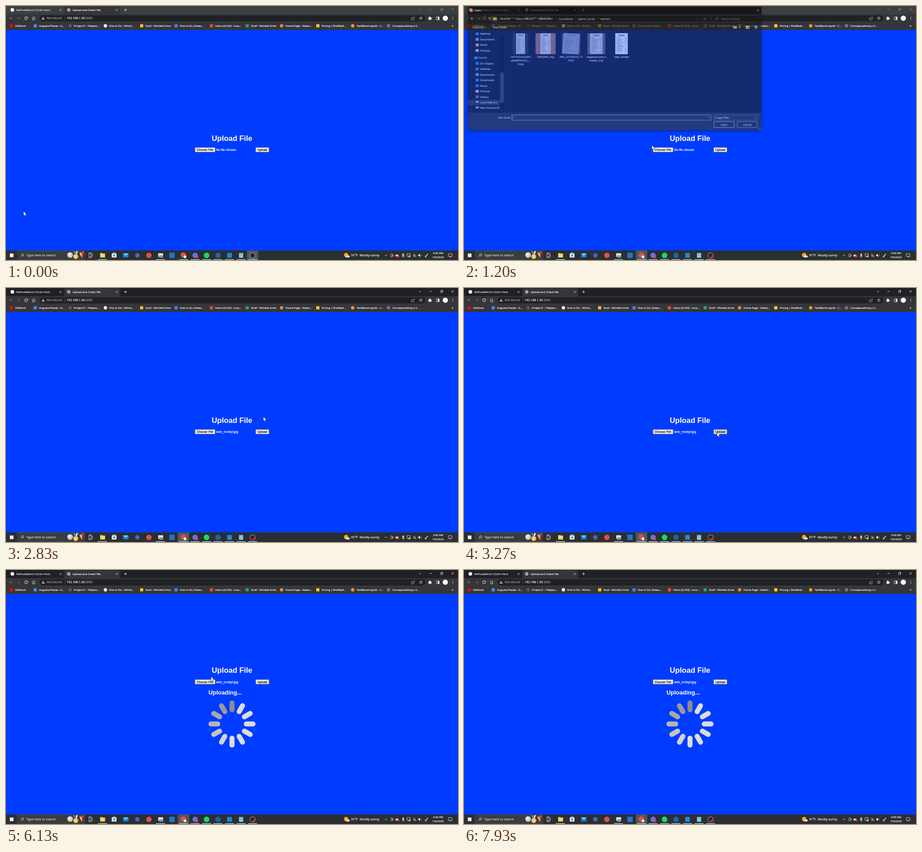
These frames come from a looping animation (998x561 px, 8000 ms). An HTML page with a canvas:

```html
<!DOCTYPE html>
<html lang="en">
<head>
<meta charset="utf-8">
<title>Upload and Check File</title>
<style>
html, body { margin: 0; width: 100%; height: 100%; overflow: hidden; background: #003cff; }
canvas { display: block; }
</style>
</head>
<body>
<canvas id="stage" width="998" height="561"></canvas>
<script>
const W = 998, H = 561, LOOP = 8000;
const FOCUS = 780, OPEN = 1130, PICK = 1900, CLOSE = 2570, UPLOAD = 3415;
const UI = '"Open Sans", "Noto Sans", sans-serif';
const PAGE = '"Liberation Sans", Arial, sans-serif';

const screen = document.getElementById('stage').getContext('2d');
const layer = document.createElement('canvas');
layer.width = W;
layer.height = H;
const dialogCtx = layer.getContext('2d');
let g = screen;

// ---- drawing helpers ----
function rect(x, y, w, h, fill, r = 0, line) {
  g.beginPath();
  g.roundRect(x, y, w, h, r);
  if (fill) { g.fillStyle = fill; g.fill(); }
  if (line) { g.strokeStyle = line; g.lineWidth = 0.8; g.stroke(); }
}
function box(x, y, size, fill, r = 0) {
  rect(x - size / 2, y - size / 2, size, size, fill, r);
}
function disc(x, y, r, fill) {
  g.beginPath();
  g.arc(x, y, r, 0, 7);
  g.fillStyle = fill;
  g.fill();
}
function ring(x, y, r, color, from = 0, to = 6.3, w = 0.9) {
  g.beginPath();
  g.arc(x, y, r, from, to);
  g.strokeStyle = color;
  g.lineWidth = w;
  g.stroke();
}
function line(color, pts, w = 0.9) {
  g.beginPath();
  for (let i = 0; i < pts.length; i += 2) g.lineTo(pts[i], pts[i + 1]);
  g.strokeStyle = color;
  g.lineWidth = w;
  g.stroke();
}
function poly(fill, pts) {
  g.beginPath();
  for (let i = 0; i < pts.length; i += 2) g.lineTo(pts[i], pts[i + 1]);
  g.closePath();
  g.fillStyle = fill;
  g.fill();
}
// y is the middle of the capital letters; small text gets a hairline for weight
function text(s, x, y, color = '#f1f3f4', size = 6, align = 'left', font = UI, weight = '') {
  g.font = `${weight} ${size}px ${font}`;
  g.textAlign = align;
  g.fillStyle = g.strokeStyle = color;
  g.lineWidth = 0.22;
  g.fillText(s, x, y + size * 0.36);
  if (size < 8) g.strokeText(s, x, y + size * 0.36);
}
const cross = (x, y, c, d = 2) => {
  line(c, [x - d, y - d, x + d, y + d]);
  line(c, [x - d, y + d, x + d, y - d]);
};
const chevron = (x, y, c, d = 2) => line(c, [x - d, y - d / 2, x, y + d / 2, x + d, y - d / 2]);
function arrow(x, y, dir, c) {
  line(c, [x - 3, y, x + 3, y], 1);
  line(c, [x, y - 2.6, x + dir * 3, y, x, y + 2.6], 1);
}
function upArrow(x, y, c) {
  line(c, [x, y + 3, x, y - 3], 1);
  line(c, [x - 2.6, y - 0.4, x, y - 3, x + 2.6, y - 0.4], 1);
}
function lens(x, y, c) {
  ring(x + 0.8, y - 0.8, 2.4, c);
  line(c, [x - 1, y + 1, x - 3.2, y + 3.2]);
}
function folder(x, y, s = 1) {
  rect(x - 4 * s, y - 4 * s, 4 * s, 3 * s, '#d9a32b', 0.5);
  rect(x - 4 * s, y - 3 * s, 8 * s, 6.5 * s, '#fbd568', 0.5);
}
function star(x, y, r, color) {
  const pts = [];
  for (let i = 0; i <= 10; i++) {
    const a = i * Math.PI / 5, q = i % 2 ? r * 0.45 : r;
    pts.push(x + q * Math.sin(a), y - q * Math.cos(a));
  }
  line(color, pts, 0.8);
}
const clamp = (v) => Math.min(1, Math.max(0, v));

// ---- browser ----
const bookmarks = [
  [20, 'VidNook', '#f00', 1], [73, 'Augusta Places - G...', '#4688f4', 0],
  [150, 'Project E – Tileplac...', '#55585c', 1], [228, 'Five to Six - Wimb...', '#f2f2f2', 1],
  [308, 'food - Wimble Drive', '#f0bd2d', 0], [384, 'Five to Six, Notes...', '#3d84e8', 0],
  [462, 'Inbox (6,163) - tuva...', '#e34b3f', 0], [541, 'Stuff - Wimble Drive', '#22a565', 0],
  [617, 'Home Page - Select...', '#e08a3a', 1], [697, 'Pricing | Briefleaf...', '#f2cc35', 0],
  [774, 'TestBench.ipynb - C...', '#f29a1d', 1], [853, 'Conceptualizing a S...', '#6e7480', 0]
];

function browser(active) {
  const ink = '#dfe1e5', cap = active ? '#e8eaed' : '#85888c';
  rect(0, 0, W, 18, active ? '#202124' : '#3c4043');
  rect(0, 18, W, 35, '#35363a');
  rect(129, 1, 123, 18, '#35363a', [4, 4, 0, 0]);
  disc(14, 8.5, 4, '#f4f4f4');
  text('MsPuddleFox7 (Colin Hart)', 23, 8.5, '#d5d8dc');
  cross(120.5, 8.7, ink);
  disc(138.5, 8.5, 3.8, '#aeb3b8');
  line('#55585c', [135.5, 7, 138, 8.5, 137, 11], 1);
  line('#55585c', [139.5, 5.5, 141.5, 8], 1);
  text('Upload and Check File', 147, 8.5);
  cross(244.5, 8.7, ink);
  line(ink, [261, 8.5, 267, 8.5], 1);
  line(ink, [264, 5.5, 264, 11.5], 1);
  chevron(914, 8, cap);
  line(cap, [935, 7.5, 940, 7.5]);
  rect(959.5, 6, 4, 4, null, 0, cap);
  line(cap, [961, 5, 964.6, 5, 964.6, 8.8], 0.7);
  cross(986, 7.5, cap, 2.4);

  arrow(11, 27, -1, '#85888c');
  arrow(28, 27, 1, '#696c70');
  ring(44.5, 27, 3, ink, 0.3, 5.5, 1.1);
  poly(ink, [45.5, 26.5, 48.4, 26.5, 48.4, 23.6]);
  line(ink, [57.5, 27, 61, 23.5, 64.5, 27], 1);
  line(ink, [58.8, 26, 58.8, 30.5, 63.2, 30.5, 63.2, 26], 1);
  rect(74, 20.5, 852, 13.5, '#202124', 6.7);
  poly('#a9adb2', [82, 23.4, 85.8, 30, 78.2, 30]);
  line('#202124', [82, 25.8, 82, 28.2], 0.8);
  text('Not secure', 90, 27, '#9aa0a6', 6.7);
  line('#5f6368', [130, 23, 130, 31], 0.7);
  text('192.168.1.30', 134, 27, '#f1f3f4', 6.7);
  text(':3000', 134 + g.measureText('192.168.1.30').width, 27, '#9aa0a6', 6.7);
  line('#bdc1c6', [897, 26, 895.5, 26, 895.5, 30.5, 901, 30.5, 901, 28.5], 0.8);
  line('#bdc1c6', [897, 28, 899, 25.5, 902, 25.5], 0.8);
  line('#bdc1c6', [900.3, 23.7, 902.3, 25.5, 900.3, 27.3], 0.8);
  star(916, 27, 3.6, '#dfe1e5');
  rect(933, 25, 5.6, 5.6, '#f1f3f4', 0.8);
  disc(935.8, 24.6, 1.3, '#f1f3f4');
  disc(939, 27.8, 1.3, '#f1f3f4');
  rect(950, 24, 6.5, 6.5, null, 0.6, '#f1f3f4');
  rect(953.4, 24, 3.2, 6.5, '#f1f3f4');
  disc(970, 27, 5.8, '#fff');
  for (const d of [-2.6, 0, 2.6]) disc(986.5, 27 + d, 0.75, '#f1f3f4');

  for (const [x, label, color, round] of bookmarks) {
    if (round) disc(x - 8.5, 43.7, 3.7, color);
    else box(x - 8.5, 43.7, 7, color, 0.8);
    text(label, x, 43.7);
  }
  text('»', 986, 43.5, '#e8eaed', 7, 'center');
}

// ---- web page ----
function button(x, y, w, label, hot) {
  rect(x, y - 5, w, 10, hot ? '#dedede' : '#efefef', 1.3, '#767676');
  text(label, x + w / 2, y, '#111', 6.93, 'center', PAGE);
}
function page(t) {
  const busy = t >= UPLOAD, y = busy ? -70.5 : 0;
  rect(0, 53, W, 488, '#003cff');
  text('Upload File', 499, 291.8 + y, '#fff', 16.63, 'center', PAGE, 'bold');
  button(417.3, 317.6 + y, 44.5, 'Choose File', t > 700 && t < OPEN);
  text(t < CLOSE + 40 ? 'No file chosen' : 'web_reciept.jpg', 464, 317.6 + y, '#fff', 6.93, 'left', PAGE);
  button(551.3, 317.6 + y, 29.4, 'Upload', t > 3050 && !busy);
  if (!busy) return;
  text('Uploading...', 447, 270, '#fff', 12.9, 'left', PAGE, 'bold');
  spinner(499, 340, Math.floor((t - UPLOAD) / 75));
}
function spinner(x, y, head) {
  g.lineCap = 'round';
  for (let k = 0; k < 12; k++) {
    const a = (head - k) * Math.PI / 6, s = Math.sin(a), c = Math.cos(a);
    const v = Math.min(220, 140 + 14 * k);
    line(`rgb(${v},${v},${v})`, [x + 31.5 * s, y - 31.5 * c, x + 46.5 * s, y - 46.5 * c], 11);
  }
  g.lineCap = 'butt';
}

// ---- taskbar ----
function taskbar(t) {
  const ink = '#f1f1f1';
  rect(0, 540, W, 21, '#2b2e32');
  box(12.5, 550.7, 8, ink);
  rect(25, 540.4, 149, 20.2, '#3a3d40', 0, '#4a4d50');
  lens(36, 550.5, ink);
  text('Type here to search', 45, 550.7, '#d0d2d4', 7.1);
  disc(141.5, 550, 6.2, '#c9ccd0');
  disc(140, 548.5, 3.2, '#e6e8ea');
  poly('#3f8bd0', [148, 541.5, 152, 541.5, 156, 549, 153, 550]);
  poly('#e9eef2', [155, 541.5, 159, 541.5, 156, 549, 154, 549]);
  disc(154, 553.3, 5.6, '#e8b73a');
  disc(154, 553.3, 3.4, '#f6d67a');
  poly('#d2492f', [161, 545, 172, 541.6, 168, 557, 164.5, 551]);
  poly('#f0d2a8', [163, 546, 166, 545, 168, 555, 166, 553]);
  rect(183, 547, 5, 7, null, 0, ink);
  line(ink, [190.5, 546.5, 190.5, 555]);
  line(ink, [182.5, 545.2, 188.5, 545.2]);
  line(ink, [182.5, 555.8, 188.5, 555.8]);

  rect(t < FOCUS ? 532 : 379.5, 540, 25, 21, '#54575a');
  folder(213.3, 550.8, 1.35);
  rect(233.5, 546.5, 10.5, 9, '#f3f3f3', 1);
  line('#f3f3f3', [236.5, 547, 236.5, 545, 241, 545, 241, 547]);
  box(238.8, 551, 4.5, '#2b9be0');
  rect(258.5, 546.5, 12, 8.8, '#1583d8', 0.8);
  poly('#7fd0ff', [258.5, 546.5, 270.5, 546.5, 264.5, 551.5]);
  disc(290, 550.8, 5, '#4767b5');
  disc(315.5, 550.8, 6, '#dd5144');
  rect(336, 546, 11, 8, '#d9dcdf', 1);
  rect(338, 551, 9, 5, '#8b9299', 1);
  box(366.5, 550.8, 12, '#2374c6', 0.5);
  disc(391.5, 550, 6, '#dd5144');
  disc(395.3, 554, 3, '#f5f5f5');
  disc(417.5, 550.8, 6, '#6a70e0');
  disc(421.5, 554.3, 2.7, '#e5483f');
  disc(442.8, 550.8, 6.2, '#1ed760');
  disc(468, 550.8, 6, '#2a5f9e');
  box(493.5, 550.8, 10.5, '#2489ca', 1);
  rect(514.5, 545, 9, 11, '#a7d3e4', 0.8);
  rect(514.5, 545, 9, 2, '#5793ab');
  for (let i = 0; i < 3; i++) line('#5c7a88', [516, 549 + i * 2, 522, 549 + i * 2], 0.6);
  disc(544.5, 550.8, 6.1, '#d9d9d9');
  disc(544.5, 550.8, 5.3, '#242326');
  if (t > 200) disc(548, 554, 2.9, '#e01f1f');
  for (const x of [213, 341, 392, 417.5, 443, 468, 493.5, 519, 544.5])
    rect(x - 10, 559.3, 20, 1.7, '#7cc3d8');

  disc(751, 550, 4.8, '#f6a623');
  rect(750, 551, 9, 4.5, '#d7dce2', 2.2);
  text('91°F', 762, 550.8, ink, 7);
  text('Mostly sunny', 781, 550.8, ink, 7);
  line(ink, [836.5, 552, 839, 549.5, 841.5, 552]);
  rect(850, 547.5, 3.5, 6.5, null, 1, ink);
  line(ink, [855, 549, 855, 552.5]);
  rect(860, 549, 7, 4.5, '#e6e6e6', 2);
  disc(866, 553, 2.5, '#e0352b');
  rect(875.5, 546.5, 3, 5.5, ink, 1.5);
  ring(877, 551, 3, ink, 0, Math.PI, 0.8);
  line(ink, [877, 554, 877, 556]);
  rect(885.5, 547, 7, 6, null, 0, ink);
  box(891, 553, 4, '#f0c040');
  for (let i = 1; i < 4; i++) ring(899, 554, i * 2, ink, -1.5, 0, 0.9);
  poly(ink, [910, 549.5, 911.5, 549.5, 914, 547, 914, 554.5, 911.5, 552, 910, 552]);
  ring(914, 550.8, 2.8, ink, -0.8, 0.8, 0.7);
  line(ink, [926, 554, 931.5, 547.5], 1.4);
  ring(927, 553, 2, ink, 0.5, 4, 0.7);
  text('3:45 PM', 954, 546, ink, 6, 'center');
  text('7/6/2023', 954, 555.3, ink, 6, 'center');
  rect(976.8, 547, 8, 6, null, 0, ink);
  line(ink, [979.5, 553, 981, 555, 982.5, 553]);
}

// ---- file dialog ----
const crumbs = [[79, 'This PC'], [112, 'Local Disk (C:)'], [163, 'JAVASCRIPT'],
  [207, 'my-website'], [251, 'python_script'], [301, 'testfold']];
const places = [['Desktop', '#2b9be0'], ['Documents', '#8fb4d4'], ['Music', '#f5cf62'], ['Pictures', '#d2d9e0'],
  ['This PC', '#3ca4e6'], ['3D Objects', '#2fa5c6'], ['Desktop', '#2b9be0'], ['Documents', '#8fb4d4'],
  ['Downloads', '#2d96e8'], ['Music', '#2d96e8'], ['Pictures', '#d2d9e0'], ['Videos', '#7b8794'],
  ['Local Disk (C:)', '#9ec7de'], ['New Volume (D:', '#c0c4c8']];
// centre, photo width, photo tone, paper width, paper tone, tilt, name lines
const files = [
  [122, 35, '#3b3733', 20, '#cfd3d5', 0, ['1af7r52mmXsEG', 'qlpeM0mhiQ_-_', 'Copy']],
  [178, 45, '#b17d57', 23, '#e6dfda', 0, ['5565298_orig']],
  [235, 42, '#4a4a4c', 37, '#a9a9ad', 0.06, ['IMG_20140523_12', '3022']],
  [291.5, 40, '#756651', 28, '#d8d8d4', 0, ['veggie-grocery-r', 'eceipt_orig']],
  [348, 28, '#ffffff', 28, '#ffffff', 0, ['web_reciept']]
];

function thumb([x, w, tone, pw, paper, tilt, name], n, picked) {
  let seed = n * 37 + 11;
  const rnd = () => (seed = (seed * 16807) % 2147483647) / 2147483647;
  if (picked) rect(x - 26.5, 57.5, 54, 60, '#6e6e6e', 0, '#858585');
  rect(x - w / 2, 59, w, 47, tone);
  g.save();
  g.translate(x, 82.5);
  g.rotate(tilt);
  rect(-pw / 2, -23, pw, 46, paper);
  rect(-pw / 4, -20, pw / 2, 3, '#8d9198');
  for (let y = -14; y < 20; y += 2.3) {
    const l = 0.25 + rnd() * 0.35;
    line('#808288', [-pw * 0.4, y, -pw * 0.4 + pw * l, y], 0.7);
    if (rnd() > 0.3) line('#808288', [pw * 0.27, y, pw * 0.4, y], 0.7);
  }
  g.restore();
  name.forEach((s, i) => text(s, x, 112.3 + i * 8, '#f0f0f0', 6, 'center'));
}

function dialog(t) {
  const ink = '#f0f0f0', dim = '#8c8c8c', picked = t >= PICK;
  rect(4, 0, 657, 276.5, '#202020');
  rect(4, 0, 657, 16, '#000');
  disc(12.5, 8, 4.2, '#dd5144');
  text('Open', 19, 8, ink);
  cross(653.5, 7.7, ink, 2.3);

  rect(4, 16, 657, 22, '#191919');
  arrow(14, 26.5, -1, ink);
  arrow(29, 26.5, 1, dim);
  chevron(41.5, 26.5, dim, 1.5);
  upArrow(52.5, 26.5, ink);
  rect(59, 19, 485, 15, '#191919', 0, '#4a4a4a');
  folder(65, 26.7);
  for (const [x, s] of crumbs) {
    line('#b0b0b0', [x - 6, 24.7, x - 4.4, 26.5, x - 6, 28.3], 0.7);
    text(s, x, 26.7, ink);
  }
  chevron(518, 26.5, dim);
  ring(535, 26.5, 2.4, '#b0b0b0', 0, 5.3);
  rect(549.5, 19, 105, 15, '#191919', 0, '#4a4a4a');
  lens(561, 26.5, dim);
  text('Search testfold', 571, 26.7, dim);

  text('Organize', 14, 45.8, ink);
  poly(ink, [41, 45, 45, 45, 43, 47.3]);
  text('New folder', 61, 45.8, ink);
  rect(598, 43, 8, 5.5, '#dce6ee');
  rect(599, 44, 3, 3.5, '#4aa0d8');
  poly(ink, [611, 45, 615, 45, 613, 47.3]);
  rect(626.5, 42.5, 8, 6.5, '#e4e4e4');
  rect(631, 43.5, 2.7, 4.5, '#3c8fc4');
  disc(649, 45.8, 4, '#1683d8');
  text('?', 649, 45.8, '#fff', 6, 'center', UI, 'bold');

  rect(4, 208, 72, 12.3, '#3b3b3b');
  places.forEach(([s, color], i) => {
    const root = i === 4, y = (i < 4 ? 60.3 : 64.3) + i * 12.46;
    const x = root ? 22 : 25;
    rect(x - 3.5, y - 3, 7, i > 11 ? 4 : 6, color, 0.5);
    if (['Desktop', 'Documents', 'Pictures'].includes(s)) disc(x - 3.5, y + 2.3, 1.6, '#d3382f');
    text(s, root ? 27 : 31.5, y, ink);
  });
  rect(76.5, 54, 8, 183, '#191919');
  rect(76.5, 147, 8, 68, '#4d4d4d');
  line('#999', [78.5, 59.5, 80.5, 57.5, 82.5, 59.5], 0.8);
  chevron(80.5, 232.5, '#999');
  line('#333', [86, 54, 86, 237], 0.6);
  files.forEach((f, i) => thumb(f, i, picked && i === 4));

  rect(4, 237, 657, 39.5, '#383838');
  text('File name:', 100, 248, ink, 6, 'right');
  rect(102.3, 242, 445.5, 11.8, '#383838', 0, '#d8d8d8');
  if (picked) text('web_reciept', 104.5, 248, ink);
  else line(ink, [104.6, 244, 104.6, 252], 0.6);
  chevron(543, 248, '#c0c0c0');
  rect(554.5, 242, 97.5, 11.8, '#383838', 0, '#8c8c8c');
  text('Image Files', 557, 248, ink);
  chevron(647, 248, '#c0c0c0');
  rect(555, 257, 45, 13, '#333', 0, '#fff');
  text('Open', 577.5, 263.5, ink, 6, 'center');
  rect(607, 257, 45, 13, '#333', 0, '#d0d0d0');
  text('Cancel', 629.5, 263.5, ink, 6, 'center');
  for (const d of [2, 4, 6]) line('#aaa', [660 - d, 275, 660, 275 - d], 0.7);
}

// the shadow falls only outside the window, so the fade stays clear
function shadow() {
  g.save();
  g.beginPath();
  g.rect(-50, -50, W + 100, H + 100);
  g.rect(4, 0, 657, 276.5);
  g.clip('evenodd');
  g.shadowColor = 'rgba(0,0,0,.45)';
  g.shadowBlur = 7;
  g.shadowOffsetY = 2;
  rect(4, 0, 657, 276.5, '#000');
  g.restore();
}

function showDialog(t) {
  if (t < OPEN || t > CLOSE + 130) return;
  g = dialogCtx;
  g.clearRect(0, 0, W, H);
  dialog(t);
  g = screen;
  const leave = 1 - clamp((t - CLOSE) / 130);
  const grow = 1 - (1 - clamp((t - OPEN) / 200)) ** 3;
  const s = 0.95 + 0.05 * grow * leave;
  g.save();
  g.globalAlpha = clamp((t - OPEN) / 112) * leave;
  g.translate(332.5, 138.2);
  g.scale(s, s);
  g.translate(-332.5, -138.2);
  shadow();
  g.drawImage(layer, 0, 0);
  g.restore();
}

// ---- pointer: time, x, y ----
const path = [[0, 39, 454], [150, 39, 454], [760, 421, 313], [1120, 421, 312], [1200, 415, 308],
  [1400, 410, 290], [1860, 368, 120], [2120, 368, 120], [2460, 575, 262], [2640, 575, 262],
  [3080, 559, 319], [3480, 559, 319], [4180, 459, 239], [5850, 459, 239], [6100, 453, 236],
  [6180, 453, 236], [6520, -14, 260], [LOOP, -14, 260]];
function pointer(t) {
  const i = path.findIndex((p) => p[0] > t);
  const [t0, x0, y0] = path[i - 1], [t1, x1, y1] = path[i];
  const u = (t - t0) / (t1 - t0), e = u * u * (3 - 2 * u);
  g.save();
  g.translate(x0 + (x1 - x0) * e, y0 + (y1 - y0) * e);
  const shape = [0, 0, 0, 8.4, 1.9, 6.7, 3.2, 9.6, 4.6, 9, 3.3, 6.1, 5.9, 6.1];
  line('#111', [...shape, 0, 0], 1);
  poly('#fff', shape);
  g.restore();
}

function frame(now) {
  const t = now % LOOP;
  page(t);
  browser((t >= FOCUS && t < OPEN) || t >= CLOSE);
  taskbar(t);
  showDialog(t);
  pointer(t);
  requestAnimationFrame(frame);
}
requestAnimationFrame(frame);
</script>
</body>
</html>
```
